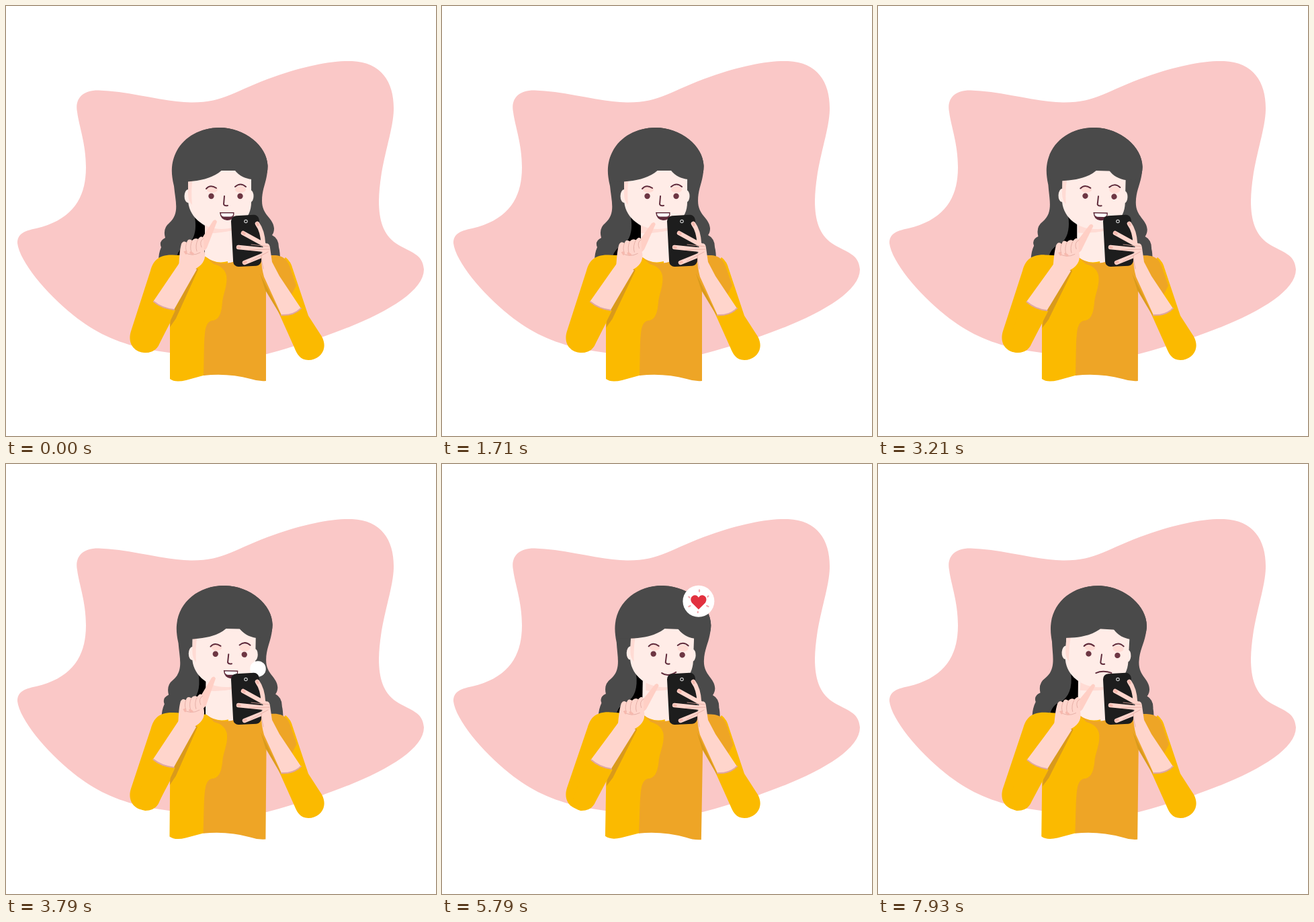
Recreate the animation shown at these times as an HTML page. Size 640x640 px, loop 8 s.

```html
<!DOCTYPE html>
<html lang="en">
<head>
<meta charset="utf-8">
<title>Phone selfie</title>
<style>
  html, body { margin: 0; width: 100%; height: 100%; overflow: hidden; background: #fff; }
  svg { display: block; width: 100%; height: 100%; }
  .yellow { fill: #fbba00; }
  .orange { fill: #eea526; }
  .shade { fill: #d99a1b; }
  .hair { fill: #4a4a4a; }
  .face { fill: #ffece7; }
  .skin { fill: #ffd5cc; }
  .blush { fill: #ffdbd4; }
  .line { fill: none; stroke: #602c3c; stroke-width: 2; stroke-linecap: round; stroke-linejoin: round; }
  .crease { fill: none; stroke: #dfa79f; stroke-width: .8; stroke-linecap: round; }
  .finger { fill: none; stroke: #ffd5cc; stroke-width: 6.5; stroke-linecap: round; }
  .nail { fill: none; stroke: #f6b9ae; stroke-width: 3.5; stroke-linecap: round; }
</style>
</head>
<body>
<svg viewBox="0 0 640 640">
  <path fill="#fac8c7" d="M106 158C102 138 114 125 138 125.5C185 127 235 143 275 143.5C325 144 340 126 400 105C445 89 485 81 515 82C560 84 578 115 577 155C576 190 556 235 555 290C555 320 562 340 580 353C603 368 620 368 622 392C622 440 500 488 388 518C340 519 290 519 243 516C180 508 140 492 100 460C60 428 20 380 17 353C17 340 25 335 45 331C100 318 119 285 119 240C119 205 109 180 106 158Z"/>

  <g id="hairBack">
    <path class="hair" d="M247 240C250 205 280 181 318 181C355 181 389 208 389.5 238C389 262 381 270 381 290C381 312 398 315 399 331Q399 337 396 341Q406 346 406 359Q408 366 408 380H227Q227 368 231 359Q227 350 237 345Q233 331 243 323C259 309 252 290 250 268Q246 252 247 240Z"/>
    <path d="M281 314L296 328V378H253Q255 362 268 357Q286 345 281 314Z"/>
  </g>

  <path class="yellow" d="M416 374Q424 380 427 392L450 461L470 492C480 510 468 527 450 527C438 527 433 518 429 508L386 412Z"/>
  <g id="torso">
    <path class="face" d="M296 315V375Q298 385 319 385Q342 385 343 372V315Z"/>
    <path class="yellow" d="M248 370.5C226 370 219 380 215 394L186 484C180 503 192 516 207 516C218 516 224 511 229 501L244 472V555Q252 561 268 557L297 549L330 420V380Q312 385 297 373Z"/>
    <path class="orange" d="M298 374Q316 388 342 380L390 371H398C414 371 420 379 424 393L432 416L409 460L387 423V558Q376 559 364 555Q330 546 294 550C295 520 294 488 298 477Q301 468 309 468C318 466 321 455 322 440C324 426 330 415 328 401Q325 388 309 384Z"/>
    <path class="shade" d="M378 398L410 462L407 458L386 423Z"/>
  </g>

  <g id="head">
    <path class="blush" d="M296 326H337V334Q316 339 296 338Z"/>
    <ellipse class="face" cx="271" cy="283" rx="5.5" ry="10"/>
    <ellipse class="face" cx="364" cy="283" rx="4.5" ry="9"/>
    <path class="face" d="M271 245H365V292C365 317 346 332 321 332C292 332 271 312 271 288Z"/>
    <path class="blush" d="M271 255H278Q275 275 277 296Q271 290 271 280Z"/>
    <path class="hair" d="M253 262C302 262 322 250 332 230C340 248 350 256 366 258L385 256Q390 248 389.5 237C388 208 355 181 318 181C280 181 250 208 248 240Z"/>
    <circle cx="305.500" cy="283" r="4.200" fill="#6d3643"/>
    <circle cx="348.500" cy="283" r="4.200" fill="#6d3643"/>
    <ellipse class="blush lid" cx="307" cy="273" rx="8" ry="5"/>
    <ellipse class="blush lid" cx="349" cy="273" rx="8" ry="5"/>
    <path class="line" d="M298 272Q304 265 313 271M341 269Q349 262 357 269M325 283L324 295Q325 298 330 297"/>
    <g id="openMouth">
      <path fill="#602c3c" d="M318 307H339.500Q340 319 329 319Q319 318 318 307Z"/>
      <path fill="#fff" d="M320 308.500H338V311Q337 313.500 334 313.500H324Q320 313 320 308.500Z"/>
    </g>
    <path id="smile" class="line" d="M319 311Q328 317 340 309"/>
    <path id="frown" class="line" d="M318 311Q328 306 341 309.500"/>
  </g>

  <g id="arm">
    <path class="shade" d="M281 388L286 392L253 465L244 478L246 450Z"/>
    <path class="yellow" d="M215 436L252 453L229 501Q224 516 207 516Q194 514 195 500Z"/>
    <path class="skin" d="M259 381L219 440Q232 451 250 452L284 392Z"/>
    <path class="crease" style="stroke-width:2" d="M220 440Q232 450 250 452"/>
    <path id="pointer" fill="#ffcfc5" d="M288 364Q284 358 289 350L308 320Q312 316 314 321L299 360Q294 368 288 364Z"/>
    <path class="skin" d="M257 392C258 376 258 365 261 354Q264 348 269 352Q271 345 277 349Q281 344 286 347Q291 340 294 346L295 363Q300 380 284 390L270 402Z"/>
    <path class="crease" d="M269 352Q266 360 269 366M277 349Q273 358 276 367M286 347Q281 356 284 365M294 346Q287 350 291 359M265 366Q276 374 289 367"/>
    <path class="nail" d="M267 366L268 368M275 367L278 369"/>
  </g>

  <g id="bubble">
    <circle r="21" fill="#fff"/>
    <g id="heart" fill="#e2313f">
      <path d="M0 11L-9 2C-14 -6 -4 -12 0 -5C4 -12 14 -6 9 2Z"/>
      <path id="rays" fill="none" stroke="#e2313f" stroke-width="2" stroke-linecap="round" d="M1 -13V-15M-1 14V15M12 -6L13 -7M-12 -5L-13 -6M11 6L13 7M-11 6L-13 7"/>
    </g>
  </g>

  <g id="phoneHand">
    <rect x="336.500" y="311.500" width="42" height="76" rx="8" fill="#1d1d1d" transform="rotate(-3 357 349)"/>
    <circle cx="357" cy="320.500" r="2.200" fill="#111" stroke="#ccc" stroke-width="1.200"/>
    <path class="skin" d="M383 355Q392 350 393 360L396 381L407 402L439 450Q426 462 410 460L384 403Q380 388 380 376Z"/>
    <path class="crease" style="stroke-width:2" d="M410 460Q428 461 439 450"/>
    <path class="finger" d="M374 324Q382 335 383 354M353 338L384 355M346 359L386 363M355 382L387 369"/>
    <path class="nail" d="M373.500 323L375 326M352 337L355 339M345 359L348 359.500M354 382L357 381"/>
    <path class="crease" d="M365 355L391 358M362 363L392 362M364 380L390 366M380 372Q381 384 383 391"/>
  </g>
</svg>
<script>
const LOOP = 8000, SWAY = 1690;
const byId = id => document.getElementById(id);
const move = (id, transform) => byId(id).setAttribute('transform', transform);
const show = (id, opacity) => byId(id).setAttribute('opacity', opacity);
const lids = document.querySelectorAll('.lid');
const clamp = x => Math.max(0, Math.min(1, x));
const ramp = (t, from, to) => clamp((t - from) / (to - from));

// Smooth curve through [time, value] pairs, flat at turning points.
function curve(keys, t) {
  const last = keys.length - 1;
  if (t <= keys[0][0]) return keys[0][1];
  if (t >= keys[last][0]) return keys[last][1];
  const i = keys.findIndex(k => k[0] > t) - 1;
  const rate = j => (keys[j + 1][1] - keys[j][1]) / (keys[j + 1][0] - keys[j][0]);
  const slope = j => {
    if (j === 0 || j === last) return 0;
    const a = rate(j - 1), b = rate(j);
    return a * b > 0 ? 2 * a * b / (a + b) : 0;
  };
  const [t0, v0] = keys[i], [t1, v1] = keys[i + 1];
  const span = t1 - t0, u = (t - t0) / span, w = 1 - u;
  return v0 * w * w * (1 + 2 * u) + v1 * u * u * (3 - 2 * u)
    + span * u * w * (slope(i) * w - slope(i + 1) * u);
}

const headShift = [[0, 0], [.243, 4.6], [.4, 6], [.69, 3], [.805, 2], [1, 0]];
const headTilt = [[0, 0], [.243, 1.1], [.44, 2.2], [.69, 3.3], [.805, 3], [1, 0]];
const armTurn = [[0, 0], [855, 2], [1710, 1], [2430, 8], [3000, 3], [3790, -.5],
  [5070, 2], [6430, 2.7], [7300, 6], [7930, 2.5], [8000, 2]];
const bubbleX = [[3500, 371], [3790, 375], [5070, 376], [6000, 384], [6430, 388], [6860, 389]];
const bubbleY = [[3500, 326], [3790, 305], [5070, 229], [6000, 199], [6430, 191], [6860, 187]];
const bubbleSize = [[3500, .2], [3790, .56], [4400, 1], [5070, 1], [6430, 1.24], [6860, 1.26]];

function draw(t) {
  const phase = t % SWAY / SWAY;
  move('torso', `rotate(${(1 - Math.cos(2 * Math.PI * phase)) / 2} 315 490)`);
  const head = `translate(${curve(headShift, phase)}) rotate(${curve(headTilt, phase)} 318 370)`;
  move('head', head);
  move('hairBack', head);

  const turn = curve(armTurn, t);
  move('arm', `rotate(${turn} 207 497)`);
  move('pointer', `translate(290 362) rotate(${turn * 2}) scale(${1 - turn / 40}) translate(-290 -362)`);

  const closing = ramp(t, 4300, 4450);
  move('openMouth', `translate(0 ${310 * closing}) scale(1 ${1 - closing})`);
  show('openMouth', closing < 1 ? 1 : 0);
  show('smile', closing === 1 && t < 7200 ? 1 : 0);
  show('frown', t >= 7200 ? 1 : 0);
  const blink = clamp(1 - Math.abs(t - 5070) / 140);
  lids.forEach(lid => lid.setAttribute('ry', 5 + 4.5 * blink));

  move('bubble', `translate(${curve(bubbleX, t)} ${curve(bubbleY, t)}) scale(${curve(bubbleSize, t)})`);
  show('bubble', t < 3500 ? 0 : 1 - ramp(t, 6050, 6640));
  move('heart', `scale(${ramp(t, 3850, 4350)})`);
  show('rays', ramp(t, 4350, 4600) * (1 - ramp(t, 5500, 6000)));
}

function tick() {
  draw(performance.now() % LOOP);
  requestAnimationFrame(tick);
}
tick();
</script>
</body>
</html>
```
